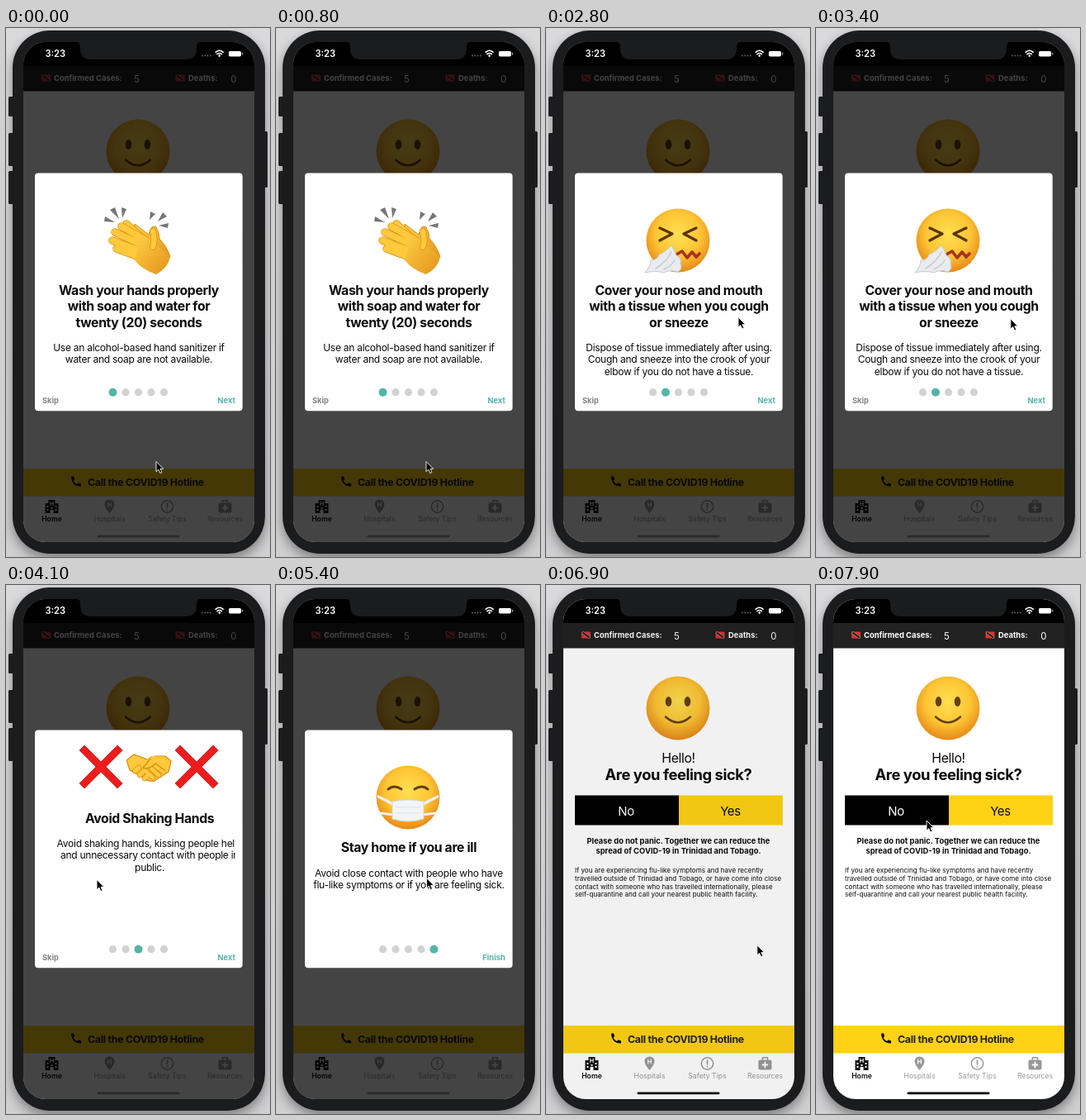
Write an HTML page that moves like this. It is 320 px wide and 640 px high and loops after 8 s.

```html
<!DOCTYPE html>
<html lang="en">
<head>
<meta charset="utf-8">
<title>Health advice app</title>
<style>
html, body { margin: 0; width: 100%; height: 100%; overflow: hidden; }
svg { display: block; width: 100vw; height: 100vh; }
text { font-family: Inter, Roboto, "Liberation Sans", sans-serif; white-space: pre; }
</style>
</head>
<body>
<svg id="stage" viewBox="0 0 320 640"></svg>
<script>
const LOOP = 8000, PAGE_WIDTH = 252, DIM = 0.735;
const INK = '#0c0c0c', TEAL = '#52b5a8', MUTED = '#999', SHELL = '#1b1c1d';

// Text block: one line per "|" section; larger sizes are tracked tighter.
function text(x, y, content, size, { weight = 400, fill = INK, anchor = 'middle', step = size * 1.2 } = {}) {
  const spacing = size > 11.5 ? -0.024 * size : 0;
  return content.split('|').map((line, i) =>
    `<text x="${x}" y="${y + i * step}" font-size="${size}" font-weight="${weight}" fill="${fill}"
      text-anchor="${anchor}" letter-spacing="${spacing}">${line}</text>`).join('');
}
const rect = (x, y, w, h, fill, r = 0) =>
  `<rect x="${x}" y="${y}" width="${w}" height="${h}" rx="${r}" fill="${fill}"/>`;
const path = (d, fill, extra = '') => `<path d="${d}" fill="${fill}" ${extra}/>`;
const line = (d, color, width) =>
  path(d, 'none', `stroke="${color}" stroke-width="${width}" stroke-linecap="round" stroke-linejoin="round"`);
const at = (x, y, content, scale = 1) => `<g transform="translate(${x} ${y}) scale(${scale})">${content}</g>`;
const outlined = (d, width) => line(d, '#d98b12', width + 1.4) + line(d, '#ffc93c', width);

// Emoji, each drawn around its own centre
const face = features => `<circle r="38.5" fill="url(#skin)"/>${features}`;
const eyes = y => [-11.5, 11.5].map(x => `<ellipse cx="${x}" cy="${y}" rx="3.8" ry="6" fill="#65400f"/>`).join('');

const smile = face(eyes(-8) + line('M-15 10.5Q0 24 15 10.5', '#65400f', 2.4));

const sneeze = face(
  line('M-22-15L-7-8L-22 0M22-15L7-8L22 0', '#5c3608', 3.2) +
  line('M-2 17L5 13L11 21L17 14L22 20L26 16', '#a8321c', 3.6) +
  path('M-8 6Q-4 12-2 18Q5 22 3 28Q6 34 0 38Q-10 35-17 39Q-27 36-40 39Q-33 31-33 24Q-25 24-23 17Q-16 15-8 6Z',
    '#e9ebee', 'stroke="#c5cad0" stroke-width="1"') +
  line('M-8 14Q-13 25-27 34M-4 24Q-8 31-17 35', '#c5cad0', 1.5));

const masked = face(
  line('M-36-1Q-25 4-17 9M36-1Q25 4 17 9M-34 19L-17 21M34 19L17 21', '#eef0f3', 3.2) +
  line('M-24-10Q-17-16-8-10M8-10Q17-16 24-10', '#65400f', 3) +
  path('M-19 5Q0 1 19 5V26Q0 32-19 26Z', '#f2f4f7', 'stroke="#d3d7dd" stroke-width="1"') +
  line('M-15 12H15M-15 19H15', '#dde1e6', 1));

const covered = face(eyes(-10) +
  outlined('M4 34L-12 14M11 34L-3 10M18 34L7 10M25 32L17 13', 8));

const clap = path('M-4-20L13-7Q16-20 22-16Q26-9 26-2Q35 7 39 20L20 30L-6 0Z', 'url(#palm)', 'stroke="#d98b12"') +
  outlined('M12 4L-14-20', 8) +
  outlined('M8-1L-20-17M6 6L-28-10M5 14L-31 0M4 21L-26 10', 8) +
  path('M4-5Q14-4 21 5L39 20Q36 34 22 41Q6 36-4 24Z', 'url(#palm)') +
  outlined('M18 8Q21-1 18-11', 6.5) +
  path('M-41-23L-40-29L-28-22ZM-34-37L-28-40L-23-26ZM-20-40L-14-38L-19-27ZM15-35L21-32L14-25ZM30-34L35-29L24-23ZM37-21L36-15L25-18Z', '#77777a');

const handshake =
  path('M-27-8L-18-15L-2-9L8-13L20-13L27-7L24 6L7 17Q1 19-7 13L-23 4Z', '#ffc93c', 'stroke="#d98b12" stroke-width="1.2"') +
  outlined('M-17 5L-12 1M-11 10L-6 5M-5 14L0 9M5 13L-4 5M12 10L3 2M18 6L8-1', 5) +
  path('M-8-3L2-13L17-12L25-4L19 4L8-4Q0 4-7 1Z', '#ffc93c') +
  line('M8-4Q0 4-7 1L2-10M8-4L19 4', '#d98b12', 1.3);
const cross = path('M-26-20L-20-26L0-6L20-26L26-20L6 0L26 20L20 26L0 6L-20 26L-26 20L-6 0Z', '#ee1c1c',
  'stroke="#b71616" stroke-width=".8"');

const flag = (x, y) => at(x, y, rect(-5.5, -4, 11, 8, '#e0302c', 1) +
  line('M-3.5-2.5L3.5 2.5', '#f0a0a0', 3.2) + line('M-3.5-2.5L3.5 2.5', '#222', 2.2));

// Advice cards
const title = (y, content) => text(161, y, content, 15.8, { weight: 700, step: 19.5 });
const body = (y, content) => text(161, y, content, 12.05, { step: 14.6 });
const pages = [
  at(160, 257, clap) +
    title(322.5, 'Wash your hands properly|with soap and water for|twenty (20) seconds') +
    body(390.5, 'Use an alcohol-based hand sanitizer if|water and soap are not available.'),
  at(160, 257, sneeze) +
    title(322.5, 'Cover your nose and mouth|with a tissue when you cough|or sneeze') +
    body(390.5, 'Dispose of tissue immediately after using.|Cough and sneeze into the crook of your|elbow if you do not have a tissue.'),
  at(102, 220, cross) + at(160, 220, handshake) + at(218, 220, cross) +
    title(287.5, 'Avoid Shaking Hands') +
    body(316.5, 'Avoid shaking hands, kissing people hello|and unnecessary contact with people in|public.'),
  at(160, 257, covered) +
    title(322.5, 'Avoid touching your face') +
    body(352.5, 'Do not touch your eyes, nose or mouth|with unwashed hands.'),
  at(160, 257, masked) +
    title(322.5, 'Stay home if you are ill') +
    body(352.5, 'Avoid close contact with people who have|flu-like symptoms or if you are feeling sick.')
];

const defs = `<defs>
  <linearGradient id="wall" x2="0" y2="1"><stop stop-color="#dadadc"/><stop offset="1" stop-color="#cfcfd1"/></linearGradient>
  <radialGradient id="skin" cy=".4" r=".64"><stop stop-color="#ffe052"/><stop offset=".55" stop-color="#fdc535"/><stop offset="1" stop-color="#e27f14"/></radialGradient>
  <linearGradient id="palm" x2="1" y2="1"><stop stop-color="#ffcf45"/><stop offset="1" stop-color="#e2921a"/></linearGradient>
  <filter id="soft" x="-20%" y="-20%" width="140%" height="140%"><feGaussianBlur stdDeviation="7"/></filter>
  <clipPath id="screen">${rect(21, 17, 280, 605, '#000', 27)}</clipPath>
  <clipPath id="card">${rect(44, 176, 234, 255, '#000')}</clipPath>
</defs>`;

const phone = rect(0, 0, 320, 640, 'url(#wall)') +
  `<g filter="url(#soft)" opacity=".4">${rect(8, 9, 306, 633, '#000', 45)}</g>` +
  [[83, 24], [127, 40], [173, 40]].map(([y, h]) => rect(3, y, 7, h, SHELL, 1.5)).join('') +
  rect(311, 125, 6, 68, SHELL, 1.5) + rect(8, 3, 306, 633, SHELL, 45);

const tabs = [
  ['Home', 55.5, INK, path('M-4-8H4V-4H8V8H2V4H-2V8H-8V-4H-4Z', INK) +
    line('M-1.7-6V-1.5M1.7-6V-1.5M-1.7-3.8H1.7', '#fff', 1.1) +
    path('M-6-1h2v2h-2zM4-1h2v2h-2zM-6 3h2v2h-2zM4 3h2v2h-2zM-1 1h2v2h-2z', '#fff')],
  ['Hospitals', 125.5, MUTED, path('M0 8Q-6 1-6-3A6 5.5 0 0 1 6-3Q6 1 0 8Z', MUTED) +
    line('M-1.8-5V0M1.8-5V0M-1.8-2.5H1.8', '#fff', 1.2)],
  ['Safety Tips', 195.5, MUTED, `<circle r="7.2" fill="none" stroke="${MUTED}" stroke-width="1.5"/>` +
    line('M0-4V.8M0 3.7V3.8', MUTED, 1.7)],
  ['Resources', 265.5, MUTED, rect(-8, -4.5, 16, 12, MUTED, 2) + line('M-3-5V-7.2H3V-5', MUTED, 1.6) +
    line('M-3 1.5H3M0-1.5V4.5', '#fff', 1.8)]
].map(([label, x, color, icon]) => at(x, 579, icon) +
  text(x, 597, label, 8.7, { weight: color === INK ? 600 : 400, fill: color })).join('');

const home = rect(21, 17, 280, 605, '#fff') + rect(21, 17, 280, 29, '#000') + rect(21, 46, 280, 30.5, '#222') +
  flag(48.5, 60.5) + text(58, 64, 'Confirmed Cases:', 9.4, { weight: 700, fill: '#fff', anchor: 'start' }) +
  text(158.5, 65.5, '5', 11.5, { fill: '#fff' }) +
  flag(211, 60.5) + text(221, 64, 'Deaths:', 9.4, { weight: 700, fill: '#fff', anchor: 'start' }) +
  text(276, 65.5, '0', 11.5, { fill: '#fff' }) +
  at(160, 149, smile) +
  text(160.5, 214.5, 'Hello!', 15.9) +
  text(160.5, 236, 'Are you feeling sick?', 18.4, { weight: 700 }) +
  rect(35, 254.5, 126, 36, '#000') + rect(161, 254.5, 126, 36, '#ffd215') +
  text(97, 278.5, 'No', 15, { fill: '#fff' }) + text(223.5, 278.5, 'Yes', 15) +
  text(160.5, 312.5, 'Please do not panic. Together we can reduce the|spread of COVID-19 in Trinidad and Tobago.', 9.4, { weight: 700, step: 12 }) +
  text(35, 348, 'If you are experiencing flu-like symptoms and have recently|travelled outside of Trinidad and Tobago, or have come into close|contact with someone who has travelled internationally, please|self-quarantine and call your nearest public health facility.', 8.1, { anchor: 'start', step: 9.8 }) +
  rect(21, 533, 280, 33, '#ffd215') +
  at(85, 548.5, path('M-6-5.5Q-5.5-6.5-3-6L-1.8-2.5L-3.5-1Q-2 2 1 3.5L2.7 1.8L6 3Q6.5 5.5 5.5 6Q-5 6-6-5.5Z', INK)) +
  text(99, 553.5, 'Call the COVID19 Hotline', 12.4, { weight: 700, anchor: 'start', fill: '#222' }) +
  rect(21, 566, 280, .8, '#ddd') + tabs;

const dots = pages.map((_, i) => `<circle class="dot" cx="${129.5 + 15.5 * i}" cy="440.7"/>`).join('');
const button = { weight: 700, fill: TEAL, anchor: 'end' };
const modal = rect(35, 175.5, 251.7, 287.7, '#fff', 4) +
  `<g clip-path="url(#card)">${pages.map(p => `<g class="page">${p}</g>`).join('')}</g>` + dots +
  `<g id="skip">${text(44, 454.3, 'Skip', 9.3, { weight: 700, fill: '#858585', anchor: 'start' })}</g>
   <g id="next">${text(278, 454.3, 'Next', 9.4, button)}</g>
   <g id="finish">${text(278, 454.3, 'Finish', 9.5, button)}</g>`;

const status = path('M84 16Q90 17 90 23V25Q90 38 103 38H218Q231 38 231 25V23Q231 17 237 16Z', SHELL) +
  text(59.8, 35, '3:23', 11.2, { weight: 600, fill: '#fff' }) +
  [238, 241.3, 244.6, 247.9].map(x => `<circle cx="${x}" cy="33.5" r=".9" fill="#666"/>`).join('') +
  line('M254.2 29.3Q258.7 25.2 263.2 29.3M256 31.7Q258.7 29.3 261.4 31.7', '#fff', 1.6) +
  `<circle cx="258.7" cy="33.6" r="1.3" fill="#fff"/>` +
  rect(270, 28, 15, 6.4, '#fff', 1.6) + rect(286, 29.7, 1.2, 3, '#aaa', .6);

const cursor = path('M0 0V12.2L2.8 9.6L4.8 14L7 13L5 8.8H8.8Z', '#000', 'stroke="#fff" stroke-width=".9" stroke-linejoin="round"');

document.getElementById('stage').innerHTML = `${defs}${phone}
  <g clip-path="url(#screen)">${home}
    <rect id="shade" x="21" y="17" width="280" height="605"/>
    <g id="modal">${modal}</g>
    <g id="bar">${rect(110.5, 613.5, 100, 2.8, '#000', 1.4)}</g>${status}
  </g><g id="cursor">${cursor}</g>`;

// Keys are [time, ...values]; values ease smoothly between them.
const scrollKeys = [[2150, 0], [2500, 1], [3600, 1], [4100, 1.948], [4250, 2], [4480, 2], [4820, 3], [4950, 3], [5300, 4]];
const pressKeys = [[6300, 1], [6420, 0.15]];
const cursorKeys = [[1000, 182, 524.5], [1700, 237.5, 520], [2100, 266, 451], [2300, 266, 451], [2800, 233, 350],
  [3500, 236, 352], [3950, 110, 356.5], [4200, 110, 356.5], [4450, 235, 352], [4700, 120, 356],
  [4920, 238, 352], [5170, 150, 356], [5400, 182.5, 354.5], [5600, 183, 355], [6200, 267, 449.5],
  [6750, 267, 449.5], [7600, 134, 285]];

function track(keys, t) {
  const next = keys.findIndex(k => k[0] > t);
  if (next === 0) return keys[0].slice(1);
  if (next < 0) return keys[keys.length - 1].slice(1);
  const [from, to] = [keys[next - 1], keys[next]];
  const u = (t - from[0]) / (to[0] - from[0]), e = u * u * (3 - 2 * u);
  return from.slice(1).map((v, i) => v + (to[i + 1] - v) * e);
}
const cubic = u => u < 0.5 ? 4 * u ** 3 : 1 - 4 * (1 - u) ** 3;
const el = id => document.getElementById(id);
const move = (node, x, y) => node.setAttribute('transform', `translate(${x} ${y})`);
const show = (id, opacity) => el(id).setAttribute('opacity', opacity);
const pageNodes = document.querySelectorAll('.page'), dotNodes = document.querySelectorAll('.dot');

function render(t) {
  const [scroll] = track(scrollKeys, t), index = Math.round(scroll), last = index === pages.length - 1;
  pageNodes.forEach((node, i) => move(node, (i - scroll) * PAGE_WIDTH, 0));
  dotNodes.forEach((node, i) => {
    node.setAttribute('r', i === index ? 5 : 4.6);
    node.setAttribute('fill', i === index ? TEAL : '#d2d2d2');
  });
  show('skip', last ? 0 : 1);
  show('next', last ? 0 : 1);
  show('finish', last ? track(pressKeys, t)[0] : 0);

  const exit = cubic(Math.min(1, Math.max(0, (t - 6460) / 600)));
  move(el('modal'), 0, exit * 640);
  show('shade', DIM * (1 - exit));
  show('bar', 0.4 + 0.6 * exit);
  move(el('cursor'), ...track(cursorKeys, t));
}

const start = performance.now();
function frame() {
  render((performance.now() - start) % LOOP);
  requestAnimationFrame(frame);
}
frame();
</script>
</body>
</html>
```
